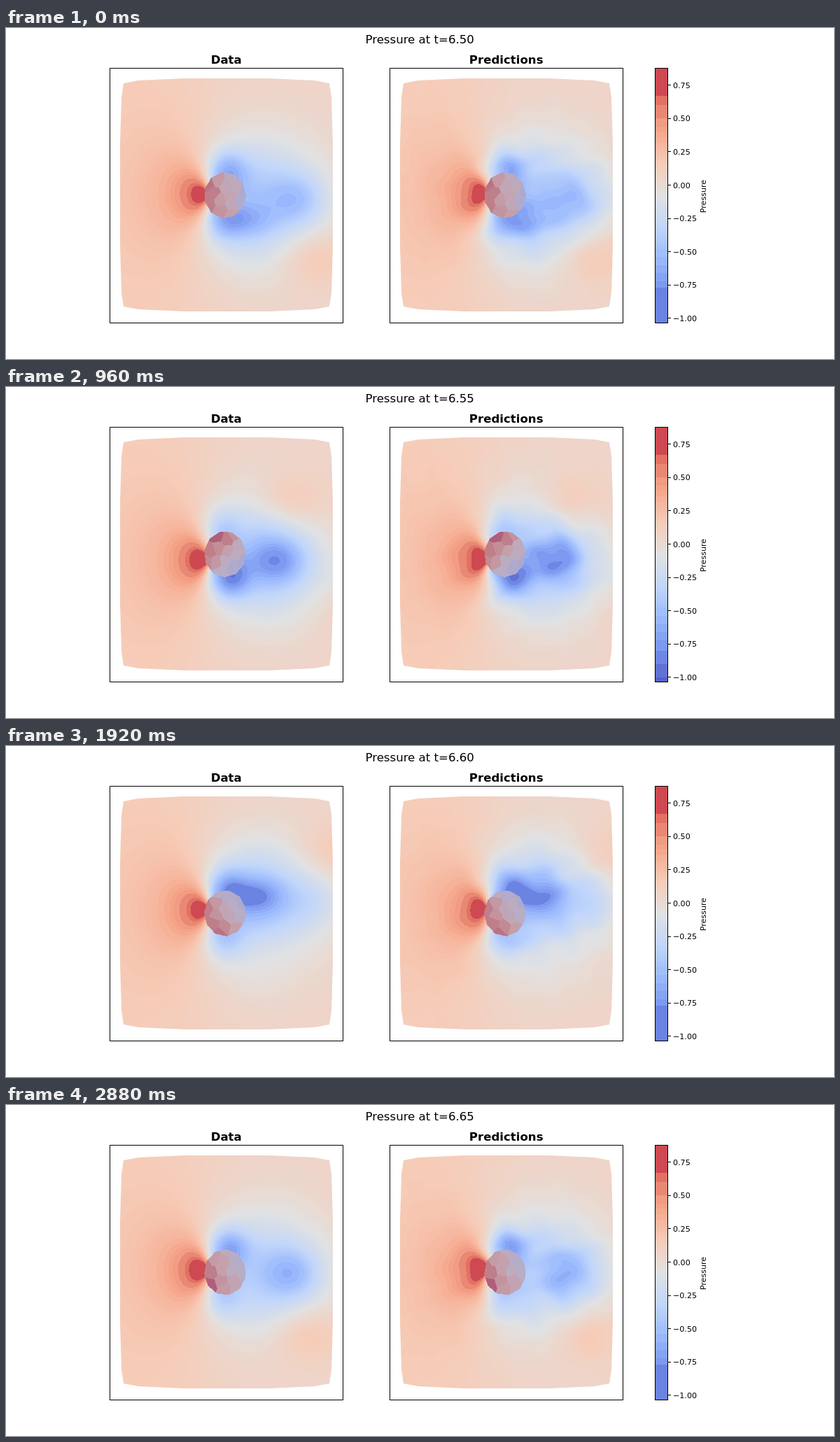
Animation, 1183 px wide and 473 px high, one loop 3.04 s. Source, as an HTML page with a canvas:

```html
<!DOCTYPE html>
<html lang="en">
<head>
<meta charset="utf-8">
<title>Pressure</title>
<style>
html, body { margin: 0; width: 100%; height: 100%; overflow: hidden; background: #fff; }
canvas, svg { position: absolute; left: 0; top: 0; width: 1183px; height: 473px; }
text { font-family: "DejaVu Sans", sans-serif; font-size: 11.1px; }
.head { font-size: 16.6px; text-anchor: middle; }
.bold { font-weight: bold; }
</style>
</head>
<body>
<canvas id="view" width="1183" height="473"></canvas>
<svg viewBox="0 0 1183 473">
  <g fill="none" stroke="#000">
    <rect x="148.5" y="57.5" width="333" height="364"/>
    <rect x="548.5" y="57.5" width="333" height="364"/>
    <rect x="927.5" y="57.5" width="18" height="364"/>
  </g>
  <text id="time" class="head" x="591.2" y="22"></text>
  <text class="head bold" x="314.7" y="51">Data</text>
  <text class="head bold" x="714.7" y="51">Predictions</text>
  <g id="ticks"></g>
  <text transform="translate(1000 240.5) rotate(-90)" text-anchor="middle">Pressure</text>
</svg>
<script>
const FRAMES = 19, STEP = 160, TAU = 2 * Math.PI;
const X0 = 162, Y0 = 71, W = 307, H = 336, MID = 239;
const ctx = document.getElementById('view').getContext('2d');
const label = document.getElementById('time');

const RAMP = ['3b4cc0', '6282ea', '8db0fe', 'b8d0f9', 'dddddd', 'f5c4ad', 'f49a7b', 'de604d', 'b40426']
  .map(hex => [0, 2, 4].map(i => parseInt(hex.substr(i, 2), 16)));
const CORNER = [[60, 166.5], [126, 163.5], [147, 159.5], [150, 140], [152, 74]];

const mod = (a, n) => (a % n + n) % n;
const clamp = (v, a, b) => Math.max(a, Math.min(b, v));
const smooth = (a, b, v) => { const t = clamp((v - a) / (b - a), 0, 1); return t * t * (3 - 2 * t); };
const wave = (k, peak) => Math.cos(TAU * (k - peak) / FRAMES);
const mix = (a, b, t) => a.map((v, i) => v + (b[i] - v) * t);
const bump = (x, y, cx, cy, sx, sy) => {
  const a = (x - cx) / sx, b = (y - cy) / sy;
  return Math.exp(-(a * a + b * b) / 2);
};

// Contour bands are fine in the middle and coarse at both ends.
function makeColor(k) {
  const deep = Math.abs(mod(k, 9.5) - 5) < 2.5;
  const level = v => {
    if (v > .67) return .77;
    if (v < -.77 && !deep) return -.87;
    const step = v < -.77 || v > .46 ? .1 : v < -.48 ? .06 : v > .3 ? .04 : .019;
    return (Math.floor(v / step) + .5) * step;
  };
  return v => {
    const t = clamp((level(v) + 1.03) / 1.91, 0, .9999) * 8, i = Math.floor(t);
    return mix(RAMP[i], RAMP[i + 1], t - i).map(c => c * .87 + 33);
  };
}

// State of one shear layer: a vortex forms, grows and drifts downstream.
function makeSide(k, top) {
  const u = mod(k + top * FRAMES / 2, FRAMES);
  const life = Math.exp(-(((u - 5) / 7) ** 2)), pull = (1 + wave(u, 6)) / 2;
  return {
    flip: y => top ? 2 * MID - y : y,
    life, x: 339 + 8.3 * u, y: 275 - 4.4 * u, h: 16 + u,
    near: .25 + .4 * pull * pull, nx: 308 + 12 * pull, ny: 275 - 4 * pull,
    warm: .26 * smooth(0, 6, u) * (1 - u / 24), wx: 342 + 10 * u, wy: 201 - 50 * smooth(0, 9, u)
  };
}

// The two layers mirror each other half a cycle apart.
function makeField(k) {
  const sides = [makeSide(k, 0), makeSide(k, 1)];
  const qy = MID + 8 * wave(k, 5);
  return (x, y) => {
    const dx = x - 292, dy = y - qy, d = Math.hypot(dx, dy) + .01;
    let p = .125 - .055 * smooth(200, 430, x);
    p += 1.04 / (1 + d * d / 1444) * smooth(-.3, 1, -dx / d);
    p -= .33 * bump(x, y, 350, MID, 50, 64);
    for (const s of sides) {
      const v = s.flip(y);
      p -= s.life * .4 * bump(x, v, s.x, s.y, 27, s.h);
      p -= s.life * .25 * bump(x, v, s.x, s.y, 50, 56);
      p -= s.near * bump(x, v, s.nx, s.ny, 19, 21);
      p += s.warm * bump(x, v, s.wx, s.wy, 35, 27);
    }
    return p;
  };
}

// Flat facets that cover the body.
function makeBody(k, color) {
  const tilt = wave(k, 5), cells = [];
  for (let i = 0; i < 14; i++) {
    const a = i * 2.4 + k * .9, r = Math.sqrt((i + .5) / 14);
    const x = r * Math.cos(a), y = r * Math.sin(a);
    const v = .2 - .45 * x - .5 * tilt * y + .08 * Math.sin(i * 5.3 + k);
    cells.push({ x, y, rgb: mix(color(v), [142, 118, 165], .48) });
  }
  return (x, y) => {
    const a = (x - 313) / 30, b = (y - MID) / 33;
    const turn = mod(Math.atan2(b, a) + k * .4, TAU / 11) - TAU / 22;
    if (Math.hypot(a, b) * Math.cos(turn) > .96) return null;
    let best = 9, rgb;
    for (const c of cells) {
      const d = (c.x - a) ** 2 + (c.y - b) ** 2;
      if (d < best) { best = d; rgb = c.rgb; }
    }
    return rgb;
  };
}

// The predicted field is the same one, slightly warped and lumpy in the wake.
function roughen(field, k) {
  return (x, y) => {
    const wake = smooth(285, 330, x) * bump(x, y, 375, MID, 60, 55);
    const amp = 1.5 + 2.5 * wake;
    const sx = Math.sin(y / 8 + x / 19 + k * 1.7) + .6 * Math.sin(y / 15 - x / 11 + k);
    const sy = Math.sin(x / 10 - y / 17 + k * 2.1) + .6 * Math.sin(x / 19 + y / 9);
    const lump = Math.sin(x / 11 + y / 14 + k) * Math.sin(y / 9 - x / 23 + k * .7);
    return field(x + amp * sx, y + amp * sy) + lump * (.006 + .03 * wake);
  };
}

function trace(g) {
  g.beginPath();
  for (const [sx, sy] of [[1, -1], [1, 1], [-1, 1], [-1, -1]]) {
    const points = sx * sy < 0 ? CORNER : [...CORNER].reverse();
    for (const [x, y] of points) g.lineTo(315 + sx * x, 238.5 + sy * y);
  }
  g.closePath();
}

function paintPanel(g, shift, field, body, color) {
  const tile = document.createElement('canvas');
  tile.width = W;
  tile.height = H;
  const t = tile.getContext('2d'), img = t.createImageData(W, H);
  for (let j = 0, n = 0; j < H; j++) {
    for (let i = 0; i < W; i++, n += 4) {
      const x = X0 + i + .5, y = Y0 + j + .5;
      img.data.set([...(body(x, y) || color(field(x, y))), 255], n);
    }
  }
  t.putImageData(img, 0, 0);
  g.save();
  g.translate(shift, 0);
  trace(g);
  g.clip();
  g.drawImage(tile, X0, Y0);
  g.restore();
}

function build(k) {
  const page = document.createElement('canvas');
  page.width = 1183;
  page.height = 473;
  const g = page.getContext('2d');
  const color = makeColor(k), field = makeField(k), body = makeBody(k, color);
  paintPanel(g, 0, field, body, color);
  paintPanel(g, 400, roughen(field, k), body, color);
  for (let y = 58; y < 421; y++) {
    g.fillStyle = `rgb(${color((224.6 - y - .5) / 190.4).map(Math.round)})`;
    g.fillRect(928, y, 18, 1);
  }
  return page;
}

let marks = '';
for (let i = 0; i < 8; i++) {
  const v = .75 - i * .25, y = 81.8 + i * 47.57;
  const name = (v < 0 ? '\u2212' : '') + Math.abs(v).toFixed(2);
  marks += `<path d="M946 ${Math.floor(y) + .5}h4" stroke="#000"/><text x="953" y="${y + 4}">${name}</text>`;
}
document.getElementById('ticks').innerHTML = marks;

const pages = [];
let shown = -1;
function tick() {
  const k = Math.floor(performance.now() / STEP) % FRAMES;
  if (k !== shown) {
    pages[k] = pages[k] || build(k);
    ctx.clearRect(0, 0, 1183, 473);
    ctx.drawImage(pages[k], 0, 0);
    label.textContent = 'Pressure at t=' + (6.504 + .0083 * k).toFixed(2);
    shown = k;
  }
  requestAnimationFrame(tick);
}
tick();
</script>
</body>
</html>
```
